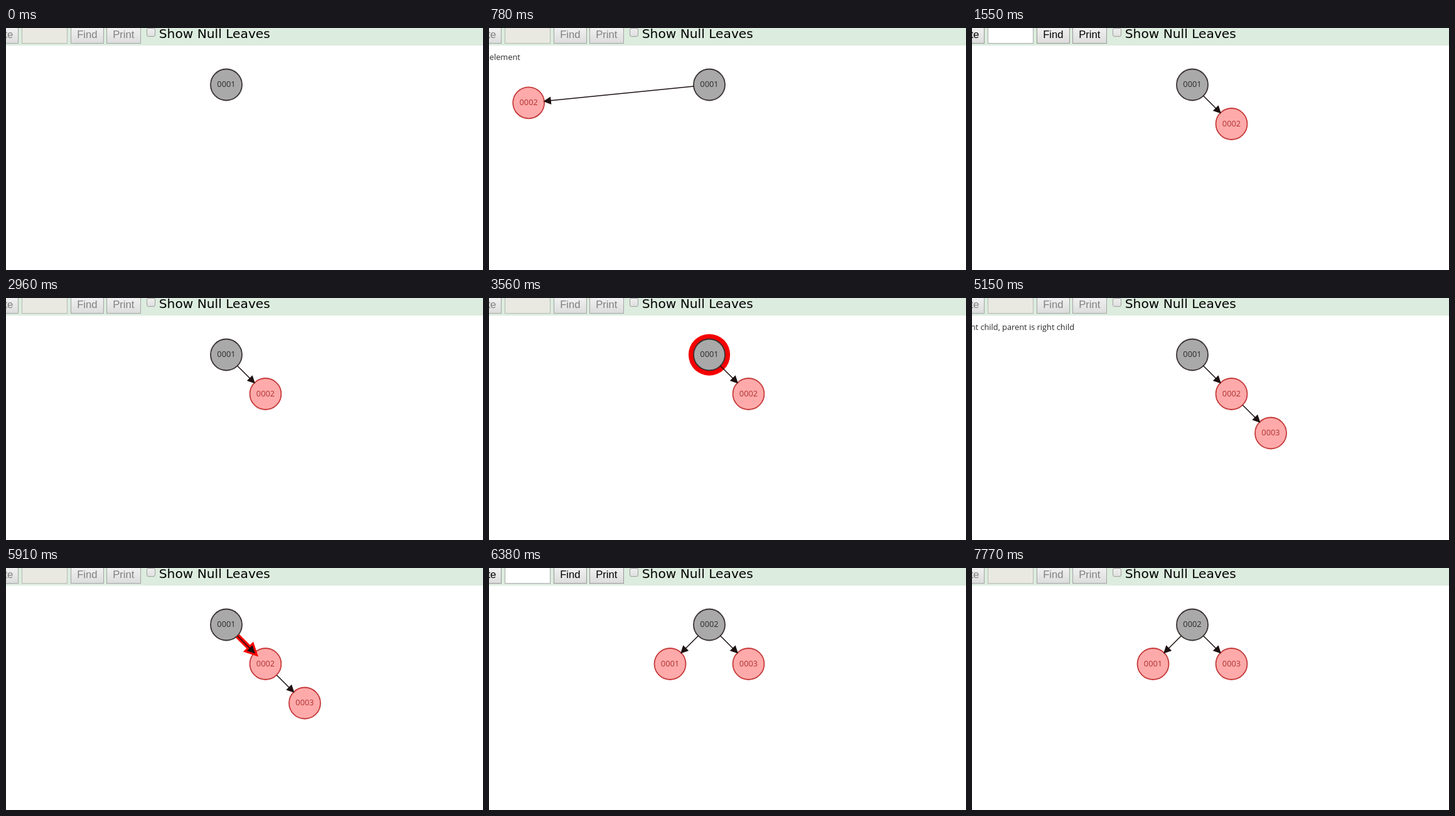
An HTML page with a canvas for the animation above (8 s loop, 760 by 386 pixels).

```html
<!DOCTYPE html>
<html lang="en">
<head>
<meta charset="utf-8">
<title>Red-black tree insertion</title>
<style>
html, body { margin: 0; width: 100%; height: 100%; overflow: hidden; background: #fff; }
canvas { display: block; }
</style>
</head>
<body>
<canvas id="stage" width="760" height="386"></canvas>
<script>
const ctx = document.getElementById('stage').getContext('2d');
const LOOP = 8000;
const R = 25;
const SMALL = '12.8px "Open Sans", "Noto Sans", sans-serif';
const RED = { fill: '#ffaaaa', line: '#c63a3a', text: '#b03030' };
const BLACK = { fill: '#a9a9a9', line: '#3a3232', text: '#2b2828' };

// Tree slots and the place where new nodes start, off the left edge
const ENTRY = [-236.5, 90.5];
const ROOT = [351, 90.5];
const LEFT = [288.5, 153];
const RIGHT = [413.5, 153];
const FAR = [476, 215.5];

const mix = (a, b, p) => a.map((v, i) => v + (b[i] - v) * p);

// Value of the last [time, value] pair already reached
function stepped(t, pairs) {
  let value = pairs[0][1];
  for (const [at, v] of pairs) if (t >= at) value = v;
  return value;
}

function text(str, x, y, font, color, align = 'left') {
  ctx.font = font;
  ctx.fillStyle = color;
  ctx.textAlign = align;
  ctx.fillText(str, x, y);
}

function box(x, w, fill, line) {
  ctx.fillStyle = fill;
  ctx.fillRect(x, -8, w, 33);
  ctx.strokeStyle = line;
  ctx.lineWidth = 1;
  ctx.strokeRect(x + 0.5, -7.5, w - 1, 32);
}

function button(label, x, w, tx, on) {
  const g = ctx.createLinearGradient(0, -8, 0, 25);
  g.addColorStop(0, '#f6f6f6');
  g.addColorStop(1, '#dcdcdc');
  box(x, w, g, on ? '#979797' : '#a3a5a3');
  text(label, tx, 16, '16.67px "Liberation Sans", Arial, sans-serif', on ? '#000' : '#808080');
}

function toolbar(on) {
  ctx.fillStyle = '#dcecde';
  ctx.fillRect(0, 0, 760, 28);
  button('Delete', -50, 70, -36.8, on);
  box(25, 73, on ? '#fff' : '#e9e9e2', on ? '#a9aaa9' : '#b4b8b2');
  button('Find', 103, 53, 113.2, on);
  button('Print', 160, 55, 170.2, on);

  const g = ctx.createLinearGradient(0, 1, 0, 14);
  g.addColorStop(0, '#eeeeee');
  g.addColorStop(1, '#dedede');
  ctx.beginPath();
  ctx.roundRect(224.5, 0.5, 13, 13, 2.5);
  ctx.fillStyle = g;
  ctx.fill();
  ctx.strokeStyle = '#a0a2a0';
  ctx.stroke();
  text('Show Null Leaves', 243.8, 16, '20.2px "DejaVu Sans", Verdana, sans-serif', '#000');
}

function arrow(tip, tail, ang, width, color) {
  const c = Math.cos(ang), s = Math.sin(ang);
  const bx = tip[0] - 10 * c, by = tip[1] - 10 * s;
  ctx.strokeStyle = ctx.fillStyle = color;
  ctx.lineWidth = width;
  ctx.beginPath();
  ctx.moveTo(tail[0], tail[1]);
  ctx.lineTo(bx, by);
  ctx.stroke();
  ctx.beginPath();
  ctx.moveTo(tip[0], tip[1]);
  ctx.lineTo(bx - 5 * s, by + 5 * c);
  ctx.lineTo(bx + 5 * s, by - 5 * c);
  ctx.closePath();
  ctx.fill();
  ctx.stroke();
}

function edge(from, to, glow) {
  const ang = Math.atan2(to[1] - from[1], to[0] - from[0]);
  const dx = R * Math.cos(ang), dy = R * Math.sin(ang);
  const tail = [from[0] + dx, from[1] + dy];
  const tip = [to[0] - dx, to[1] - dy];
  if (glow) arrow(tip, tail, ang, glow, '#ff0000');
  arrow(tip, tail, ang, 1.5, '#1c1010');
}

function disc(p, r) {
  ctx.beginPath();
  ctx.arc(p[0], p[1], r, 0, Math.PI * 2);
}

function node(label, p, look, ring) {
  if (ring) {
    disc(p, ring);
    ctx.fillStyle = '#f40000';
    ctx.fill();
  }
  disc(p, R);
  ctx.fillStyle = look.fill;
  ctx.fill();
  ctx.strokeStyle = ring && look === RED ? '#f40000' : look.line;
  ctx.lineWidth = 1.8;
  ctx.stroke();
  text(label, p[0], p[1] + 3.9, SMALL, look.text, 'center');
}

function message(t) {
  const say = (str, right) => text(str, right, 50.8, SMALL, '#2a2a2a', 'right');
  if ((t >= 300 && t < 1410) || (t >= 4350 && t < 5150)) {
    say('Found null tree (or phantom leaf), inserting element', 49.8);
  } else if (t >= 5150 && t < 5610) {
    say('Node and parent are both red.  Node is right child, parent is right child', 163);
  }
}

function tree(t) {
  const in2 = stepped(t, [[300, 0], [460, 0.06], [620, 0.2], [780, 0.461], [950, 0.74], [1100, 1]]);
  const in3 = stepped(t, [[4350, 0], [4510, 0.33], [4670, 0.67], [4820, 1]]);
  const turn = stepped(t, [[0, 0], [5930, 0.33], [6080, 0.67], [6230, 1]]);
  const turned = t >= 5930;

  const one = mix(ROOT, LEFT, turn);
  const two = turned ? mix(RIGHT, ROOT, turn) : mix(ENTRY, RIGHT, in2);
  const three = turned ? mix(FAR, RIGHT, turn) : mix(ENTRY, FAR, in3);

  // Shrinking highlight ring, first on the root, then on its child
  const beat = stepped(t, [0, 160, 320, 480, 640, 810, 970].map((d, k) => [3250 + d, k]));
  const ring = t >= 3250 && t < 4350 ? 34 - 5.25 * beat / 6 : 0;
  const glow = t >= 5610 && !turned ? stepped(t, [[5610, 8.7], [5770, 7.9]]) : 0;

  node('0001', one, turned ? RED : BLACK, beat < 4 ? ring : 0);
  if (t >= 300) node('0002', two, turned ? BLACK : RED, beat >= 4 ? ring : 0);
  if (t >= 4350) node('0003', three, RED);

  // Arrows lie over the nodes
  if (turned) edge(two, one);
  else if (t >= 300) edge(one, two, glow);
  if (t >= 4350) edge(two, three);
}

function draw(t) {
  ctx.fillStyle = '#fff';
  ctx.fillRect(0, 0, 760, 386);
  toolbar((t >= 1550 && t < 2960) || (t >= 6380 && t < 7770));
  message(t);
  tree(t);
}

const start = performance.now();
function tick() {
  draw((performance.now() - start) % LOOP);
  requestAnimationFrame(tick);
}
tick();
</script>
</body>
</html>
```
